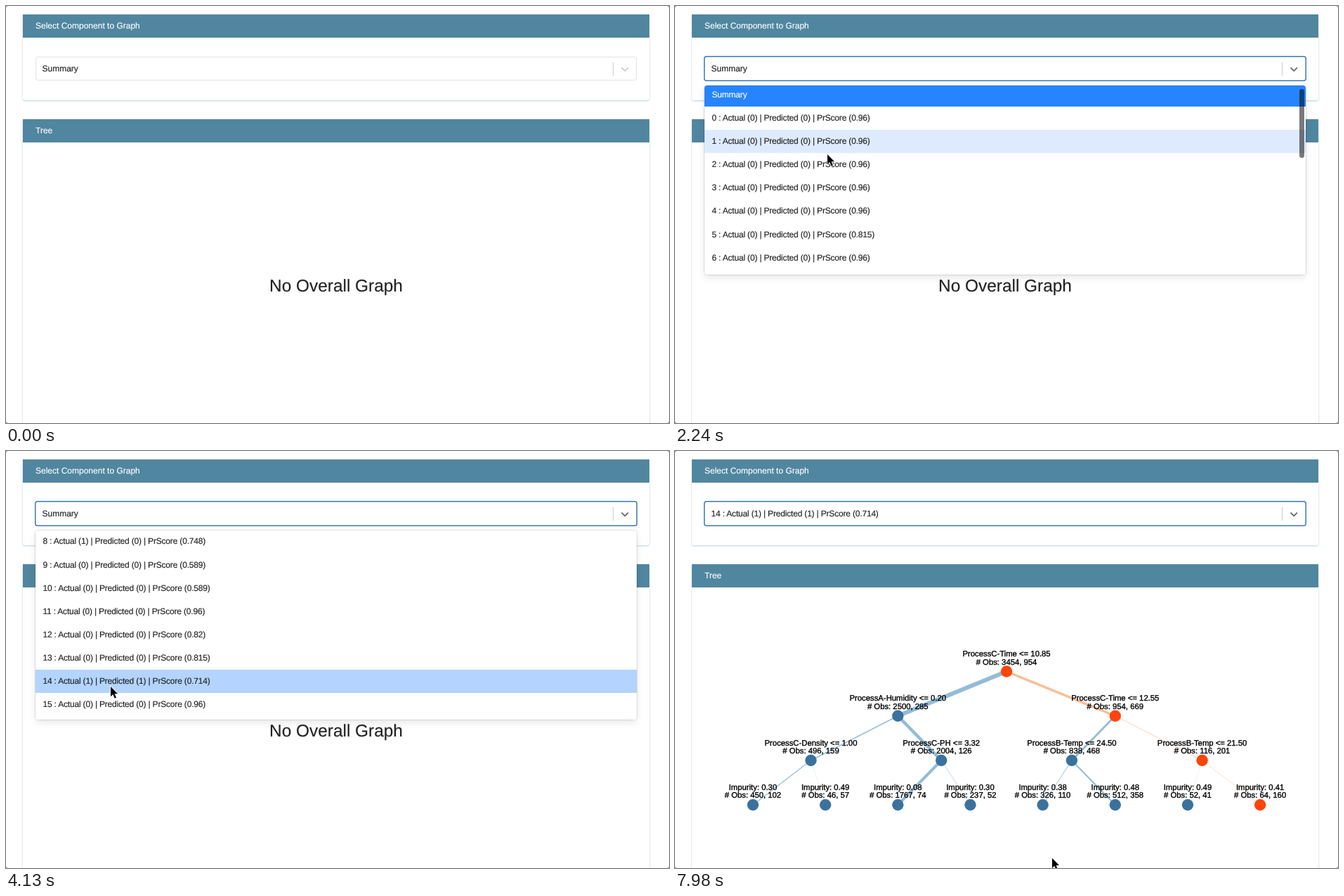
Animation of 944 by 593 pixels, one loop 8 s. Source, as an HTML page:

```html
<!DOCTYPE html>
<html lang="en">
<head>
<meta charset="utf-8">
<title>Component tree</title>
<style>
html, body { margin: 0; width: 100%; height: 100%; overflow: hidden; background: #777; }
body { position: relative; font: 12px "Liberation Sans", Arial, sans-serif; color: #222;
  text-rendering: geometricPrecision; -webkit-text-stroke: .15px; }
div, svg { position: absolute; box-sizing: border-box; white-space: pre; }
#page { width: 944px; height: 593px; background: #fff; border-radius: 3px; overflow: hidden; }
.card { left: 24px; width: 892px; background: #fff; border-radius: 3px; box-shadow: 0 1px 3px #b9d0dd; }
.card div { width: 100%; height: 33px; padding-left: 18px; line-height: 33px; background: #50869f; color: #fff; }
#select { left: 42px; top: 72px; width: 856px; height: 34px; border-radius: 4px; box-shadow: inset 0 0 0 1px #e3e3e3; }
#select.focus { left: 41px; top: 71px; width: 858px; height: 36px; box-shadow: inset 0 0 0 1.5px #3b78b5; }
#value { left: 51.5px; top: 72px; line-height: 35px; }
#caret { left: 52px; top: 83px; width: 1px; height: 14px; background: #222; }
#divider { left: 864px; top: 80px; width: 1px; height: 19px; background: #ccc; }
#empty { left: 24px; top: 380px; width: 892px; text-align: center; font-size: 24.4px; line-height: 38px; }
#menu { left: 42px; top: 113px; width: 856px; height: 269px; overflow: hidden; background: #fff; border-radius: 4px; }
#shade { left: 42px; top: 113px; width: 856px; height: 269px; border-radius: 4px;
  box-shadow: 0 0 0 1px rgba(0,0,0,.1), 0 4px 11px rgba(0,0,0,.1); }
#list { width: 100%; }
.row { width: 100%; height: 33.15px; line-height: 33px; padding-left: 10.4px; }
.row, .spaced { letter-spacing: -.18px; }
.row.hover { background: #deebff; }
.row.press { background: #b2d4ff; }
.row.chosen { background: #2684ff; color: #fff; }
#thumb { left: 847px; width: 7px; height: 98px; border-radius: 4px; background: rgba(0,0,0,.52); }
svg { left: 0; top: 0; }
#tree text { font-size: 11.3px; text-anchor: middle; fill: #000; stroke: #000; stroke-width: .35px; }
</style>
</head>
<body>
<div id="page">
  <div class="card" style="top:12px;height:122px"><div>Select Component to Graph</div></div>
  <div class="card" style="top:161px;height:500px"><div>Tree</div></div>
  <div id="empty">No Overall Graph</div>
  <svg id="tree" width="944" height="593"></svg>
  <div id="select"></div><div id="value"></div><div id="caret"></div><div id="divider"></div>
  <svg width="944" height="593"><path id="chevron" d="M876.5 87.7l4.7 4.6 4.7-4.6" fill="none" stroke-width="1.8"/></svg>
  <div id="shade"></div>
  <div id="menu"><div id="list"></div><div id="thumb"></div></div>
  <svg width="944" height="593"><path id="cursor" d="M0 0v14.2l3.3-3.1 2.4 5.6 2.3-1-2.4-5.4h4.5z"
    stroke="#fff" stroke-width="1.6" paint-order="stroke"/></svg>
</div>
<script>
const $ = id => document.getElementById(id);
const STEP = 70, LOOP = 8000, ENTER = 280, OPEN = 1540, PRESS = 4130, PICK = 4270;
const ROW = 33.15, LIST_TOP = 116.5, LAG = 35;

// Class counts at the leaves; every parent holds the sum of its two children
const leaves = [[450, 102], [46, 57], [1767, 74], [237, 52], [326, 110], [512, 358], [52, 41], [64, 160]];
const rules = [
  ["ProcessC-Time <= 10.85"],
  ["ProcessA-Humidity <= 0.20", "ProcessC-Time <= 12.55"],
  ["ProcessC-Density <= 1.00", "ProcessC-PH <= 3.32", "ProcessB-Temp <= 24.50", "ProcessB-Temp <= 21.50"]
];
const total = ([a, b]) => a + b;
const gini = obs => 2 * obs[0] * obs[1] / total(obs) ** 2;
const countsAt = (depth, i) => depth === 3 ? leaves[i] :
  [0, 1].map(k => countsAt(depth + 1, 2 * i)[k] + countsAt(depth + 1, 2 * i + 1)[k]);

function drawTree() {
  const nodeX = (depth, i) => 7.8 + 928.5 * (i + 1) / (2 ** depth + 1);
  const nodeY = depth => 313.5 + 63.25 * depth;
  let edges = "", nodes = "", labels = "";
  for (let depth = 0; depth < 4; depth++) for (let i = 0; i < 2 ** depth; i++) {
    const x = nodeX(depth, i), y = nodeY(depth), obs = countsAt(depth, i);
    const onPath = i === 2 ** depth - 1; // the rightmost branch is the chosen one
    const title = depth < 3 ? rules[depth][i].replace("<", "&lt;") : `Impurity: ${gini(obs).toFixed(2)}`;
    if (depth) edges += `<line x1="${nodeX(depth - 1, i >> 1)}" y1="${nodeY(depth - 1)}" x2="${x}" y2="${y}"
      stroke="${onPath ? "#f9bf96" : "#93bcd7"}" stroke-width="${total(obs) / 465}"/>`;
    nodes += `<circle cx="${x}" cy="${y}" r="8.2" fill="${onPath ? "#fe4409" : "#3a729d"}"/>`;
    labels += `<text x="${x}" y="${y - 21.3}">${title}</text>
      <text x="${x}" y="${y - 10}"># Obs: ${obs.join(", ")}</text>`;
  }
  $("tree").innerHTML = edges + nodes + labels;
}
drawTree();

// Each option falls into one leaf, which sets its prediction and score
const options = ["Summary", ..."2222202545523072"].map((leaf, i) => {
  if (!i) return leaf;
  const obs = leaves[leaf], id = i - 1;
  const score = +(Math.max(...obs) / total(obs)).toFixed(3);
  return `${id} : Actual (${+[7, 8, 14].includes(id)}) | Predicted (${+(obs[1] > obs[0])}) | PrScore (${score})`;
});
const rows = options.map((label, i) => {
  const row = document.createElement("div");
  row.textContent = label;
  row.style.top = 3.5 + ROW * i + "px";
  $("list").append(row);
  return row;
});

// Pointer moves: start, end, x, y
const moves = [
  [0, ENTER, 443, 532], [ENTER, 1050, 287, 73], [1190, 1400, 268, 95], [1470, 2100, 217, 211],
  [2240, 2800, 181, 236], [3220, 3860, 149, 335], [4620, 5460, 497, 291], [5530, 5740, 619, 370],
  [5740, 6090, 356, 399], [6370, 6650, 598, 364], [6930, 7350, 738, 433], [7560, 7770, 356, 460],
  [7770, 7980, 537, 579]
];
const progress = (t, start, end) => Math.min(1, Math.max(0, (t - start) / (end - start)));
const easeOut = (k, power) => 1 - (1 - k) ** power;
const smooth = k => k * k * (3 - 2 * k);

function pointerAt(t) {
  let [, , x, y] = moves[0];
  for (const [start, end, toX, toY] of moves) {
    const k = easeOut(progress(t, start, end), 3);
    x += (toX - x) * k;
    y += (toY - y) * k;
  }
  return [x, y];
}
const scrollAt = t => 302.5 * smooth(easeOut(progress(t, 2185, 3150), 1.6));
const show = (id, on) => $(id).style.display = on ? "" : "none";

function render(t) {
  const focused = t >= OPEN, picked = t >= PICK, open = focused && !picked;
  $("select").className = focused ? "focus" : "";
  $("chevron").setAttribute("stroke", focused ? "#666" : "#ccc");
  $("value").textContent = options[picked ? 15 : 0];
  $("value").className = picked ? "spaced" : "";
  show("caret", open && (t - OPEN) % 1000 < 500);
  show("empty", !picked);
  show("tree", picked);
  show("menu", open);
  show("shade", open);

  const scroll = scrollAt(t);
  $("list").style.top = -scroll + "px";
  $("thumb").style.top = 2.5 + scroll / 2.62 + "px";
  show("thumb", scroll > 0 && t < 3850);
  // The highlight trails the pointer slightly
  const hover = Math.floor((pointerAt(t - LAG)[1] + scrollAt(t - LAG) - LIST_TOP) / ROW);
  rows.forEach((row, i) => row.className = "row" +
    (i === 0 ? " chosen" : i === hover ? (t >= PRESS ? " press" : " hover") : ""));

  const [x, y] = pointerAt(t);
  $("cursor").setAttribute("transform", `translate(${x} ${y})`);
  show("cursor", t >= ENTER);
}

function frame() {
  const t = performance.now() % LOOP;
  render(Math.floor(t / STEP) * STEP);
  requestAnimationFrame(frame);
}
frame();
</script>
</body>
</html>
```
